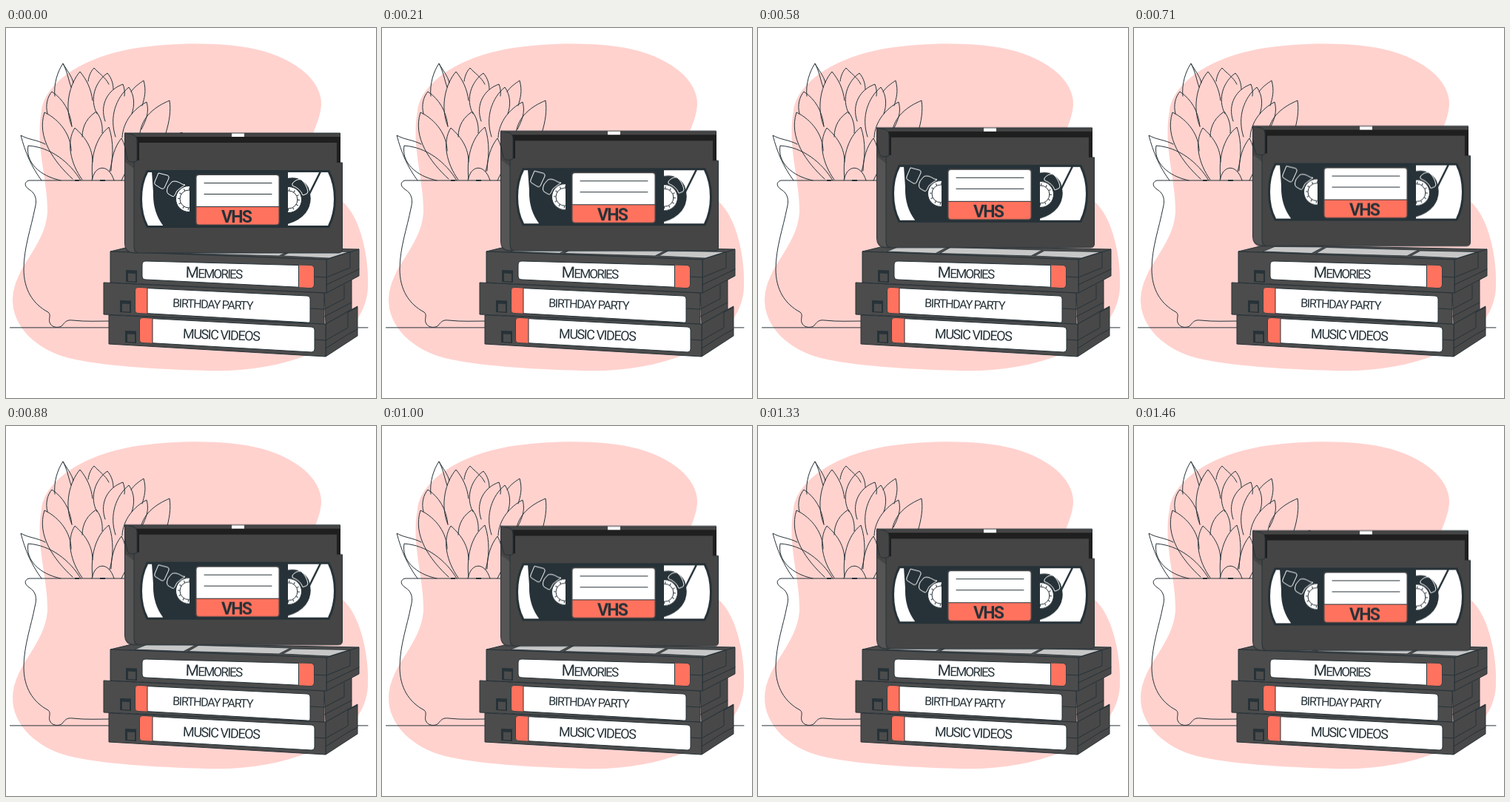
Write an HTML page that moves like this. It is 500 by 500 pixels and loops after 1500 ms.

```html
<!DOCTYPE html>
<html lang="en">
<head>
<meta charset="utf-8">
<title>Video tapes</title>
<style>
  html, body { margin: 0; width: 100%; height: 100%; overflow: hidden; background: #fff; }
  svg { display: block; width: 100vw; height: 100vh; }
  .ink { fill: none; stroke: #263238; stroke-width: 1; stroke-linejoin: round; stroke-linecap: round; }
  .case { fill: #454545; stroke: #263238; stroke-width: 1; stroke-linejoin: round; }
  .pile .case { fill: #4c4c4c; }
  .pile .side { fill: #484848; }
  .dark { fill: #263238; }
  .red { fill: #ff725e; }
  .white { fill: #fff; }
  .panel { fill: #c7c7c7; stroke: #263238; stroke-width: .8; stroke-linejoin: round; }
  .edge { fill: #263238; stroke: #fff; stroke-width: 1; stroke-linejoin: round; }
  text { font-family: Roboto, "Open Sans", "Liberation Sans", sans-serif; letter-spacing: -.08em; fill: #263238; text-anchor: middle; }
  .bob { animation: bob 1.5s steps(18) infinite; }
  @keyframes bob {
    50% { transform: translateY(-10px); }
  }
</style>
</head>
<body>
<svg viewBox="0 0 500 500">
  <defs>
    <clipPath id="left"><path d="M192 195H248V267H192Q184 252 184 231T192 195Z"/></clipPath>
    <clipPath id="right"><path d="M381 195H435Q443 211 443 231T435 267H381Z"/></clipPath>
    <clipPath id="l1"><path id="p1" d="M189 315L411 321Q416 321 416 326V346Q416 351 411 351L189 340Q184 340 184 335V320Q184 315 189 315Z"/></clipPath>
    <clipPath id="l2"><path id="p2" d="M179 351L407 362Q411 362 411 366V395Q411 399 407 398L179 385Q175 385 175 381V355Q175 351 179 351Z"/></clipPath>
    <clipPath id="l3"><path id="p3" d="M185 392L413 404Q417 404 417 408V434Q417 438 413 438L185 425Q181 425 181 421V396Q181 392 185 392Z"/></clipPath>
    <g id="hub">
      <circle r="17.5" class="white" stroke="#263238"/>
      <circle r="13.5" fill="none" stroke="#263238" stroke-width="3" stroke-dasharray="1 6.07"/>
      <circle r="12" class="ink"/>
    </g>
    <g id="notch">
      <path class="dark" d="M0 0L15 .6V17L0 16Z"/>
      <path fill="#4c4c4c" d="M3 4.500L13 5V15.500L3 15Z"/>
    </g>
  </defs>

  <path fill="#ffd2ce" d="M48 112C52 78 95 42 170 28C225 19 300 18 347 31C390 43 427 70 426 104C424 132 405 152 408 181C414 214 447 220 464 245C481 268 491 314 489 352C487 385 465 418 410 441C370 457 320 465 270 463C205 461 130 457 85 446C42 435 8 404 9 366C11 322 52 297 56 250C57 206 39 160 48 112Z"/>
  <path class="ink" d="M5.500 404.900H140M474 404.900H489"/>

  <!-- plant -->
  <g class="ink">
    <path d="M66 92C64 76 70 58 77 48C82 57 89 65 91 74M77 48C83 59 84 69 88 80"/>
    <path d="M89 133C78 106 86 75 100 59C109 70 115 82 117 98"/>
    <path d="M111 72C112 64 115 58 119 54C125 61 134 66 139 76"/>
    <path d="M123 116C112 96 121 72 137 61C143 68 145 76 145 83"/>
    <path d="M134 126C126 103 138 83 158 76C160 81 161 87 160 92"/>
    <path d="M148 147C139 120 149 94 166 80C174 91 174 105 170 116"/>
    <path d="M169 86C174 79 180 75 186 71C190 85 187 95 184 105"/>
    <path d="M157 148C158 126 173 109 190 100C194 114 189 125 183 137"/>
    <path d="M181 142C184 119 202 106 221 98C223 112 221 125 216 142"/>
    <path d="M56 116C53 104 56 93 62 86C77 96 87 112 89 133"/>
    <path d="M90 204C65 181 41 148 52 114C73 124 88 145 88 166"/>
    <path d="M48 206C34 187 26 168 20 145C30 151 42 151 53 157"/>
    <path d="M74 206C45 200 26 181 30 159C60 161 86 181 101 206"/>
    <path d="M103 205C87 183 81 154 93 135C109 149 117 164 117 181"/>
    <path d="M103 147C103 131 111 120 122 113C129 122 131 134 130 142"/>
    <path d="M117 204C114 177 120 149 139 134C146 154 145 178 140 194"/>
    <path d="M116 206C120 184 139 183 146 206"/>
    <path d="M142 193C142 176 147 160 156 149C160 156 162 164 162 173M156 206L162 194"/>
    <path d="M222 152C227 146 232 143 238 141L239 148"/>
  </g>
  <path class="ink" d="M162 206H31C24 208 25 214 31 218C41 224 42 233 39 244C34 270 24 297 24 326C24 353 36 373 57 384C62 388 56 394 60 400C64 406 73 405 76 402C80 397 82 394 90 395C108 397 124 396 142 396"/>
  <path stroke="#263238" stroke-width="1.800" d="M93 206H99M127 206H134"/>

  <g class="pile">
    <!-- bottom -->
    <path class="case side" d="M432 400L475 376V416L432 444Z"/>
    <path class="case" d="M139 388L432 400V444L139 427Z"/>
    <path class="ink" d="M417 421L432 422L462 405V384L474 378M432 433L462 414L475 407"/>
    <use href="#p3" class="white" stroke="#263238"/>
    <path class="red" clip-path="url(#l3)" stroke="#263238" d="M180 390H198V430H180Z"/>
    <use href="#notch" x="161" y="409"/>
    <text transform="translate(290.500 421) rotate(2)" font-size="18">MUSIC VIDEOS</text>

    <!-- middle -->
    <path class="case side" d="M430 358L467 340V380L432 400Z"/>
    <path class="case" d="M132 344L430 358V400L132 387Z"/>
    <path class="ink" d="M411 379L430 380L457 366V347M430 390L467 371"/>
    <use href="#p2" class="white" stroke="#263238"/>
    <path class="red" clip-path="url(#l2)" stroke="#263238" d="M174 349H191V390H174Z"/>
    <use href="#notch" x="154" y="368"/>
    <text transform="translate(279 379) rotate(2)" font-size="16">BIRTHDAY PARTY</text>

    <!-- top -->
    <path class="case" d="M141 302L178 293L477 299L433 313Z"/>
    <path class="panel" d="M174 302L190 295.500L256 296L240 304.500Z"/>
    <path class="panel" d="M246 304.500L260 296.500L384 300L369 308Z"/>
    <path class="panel" d="M374 308L387 301L464 302.500L437 311Z"/>
    <path class="case side" d="M433 313L477 299V335L433 358Z"/>
    <path class="case" d="M141 302L433 313V358L141 344Z"/>
    <path class="ink" d="M416 336L433 337L465 324V303M433 347L477 326"/>
    <use href="#p1" class="white" stroke="#263238"/>
    <path class="red" clip-path="url(#l1)" stroke="#263238" d="M395.500 312H418V354H395.500Z"/>
    <use href="#notch" x="162" y="327"/>
    <text transform="translate(280.500 338) rotate(1)" font-size="21">M<tspan font-size="17">EMORIES</tspan></text>
  </g>

  <!-- floating tape -->
  <g class="bob">
    <path class="case" d="M160.500 142H451.500V182H454.500V299Q454.500 304 449 304H173Q160.500 304 160.500 291Z"/>
    <path fill="#555" d="M161 181L173 190V303Q161 302 161 291Z"/>
    <path class="ink" d="M173 181V295Q173 302 178 304"/>
    <path fill="#1f1f1f" d="M176 147H452V182H447V155H180V179H176Z"/>
    <path fill="#454545" d="M180 155.500H446.500V182H180Z"/>
    <path class="case" d="M160.500 142L171 144Q177 146 177 152V178Q177 181 173 181H168Q164 180 163 173L160.500 160Z"/>
    <path class="white" d="M305 142.500H322V147H305Z"/>

    <path class="dark" d="M190 192H437Q446 209 446 231T437 270H190Q181 253 181 231T190 192Z"/>
    <g clip-path="url(#left)">
      <path class="white" d="M180 190H250V270H180Z"/>
      <path class="dark" d="M197 194H249V268H213Q198 249 199 222Z"/>
      <path class="edge" d="M206 196L218 199Q221 200 220 203L214 216Q213 218 210 217L202 212Q200 211 201 208Z"/>
      <path class="edge" d="M224 208Q229 205 238 211L242 212L236 216Q230 219 228 226Q227 229 224 227L219 224Q216 221 219 214Z"/>
      <use href="#hub" x="247" y="231"/>
    </g>
    <g clip-path="url(#right)">
      <path class="white" d="M380 190H445V270H380Z"/>
      <path class="dark" d="M380 203Q399 199 409 216Q416 235 405 250Q396 261 380 265Z"/>
      <path stroke="#263238" stroke-width="2.500" d="M425 194L409 226"/>
      <path class="edge" d="M387 210Q393 203 399 205Q406 211 408 221Q408 224 404 225L401 226Q398 217 387 213Z"/>
      <use href="#hub" x="382" y="232"/>
    </g>
    <rect class="case" x="255.500" y="197" width="115" height="70" rx="4"/>
    <path class="white" d="M261 199H365Q368.500 199 368.500 202V241H257.500V202Q257.500 199 261 199Z"/>
    <path class="red" d="M257.500 241.500H368.500V262Q368.500 265.500 365 265.500H261Q257.500 265.500 257.500 262Z"/>
    <path class="ink" d="M268 209.500H359M268 224.500H359M257.500 241.500H368.500"/>
    <text x="311" y="263" font-size="23" font-weight="700">VHS</text>
  </g>
</svg>
</body>
</html>
```
